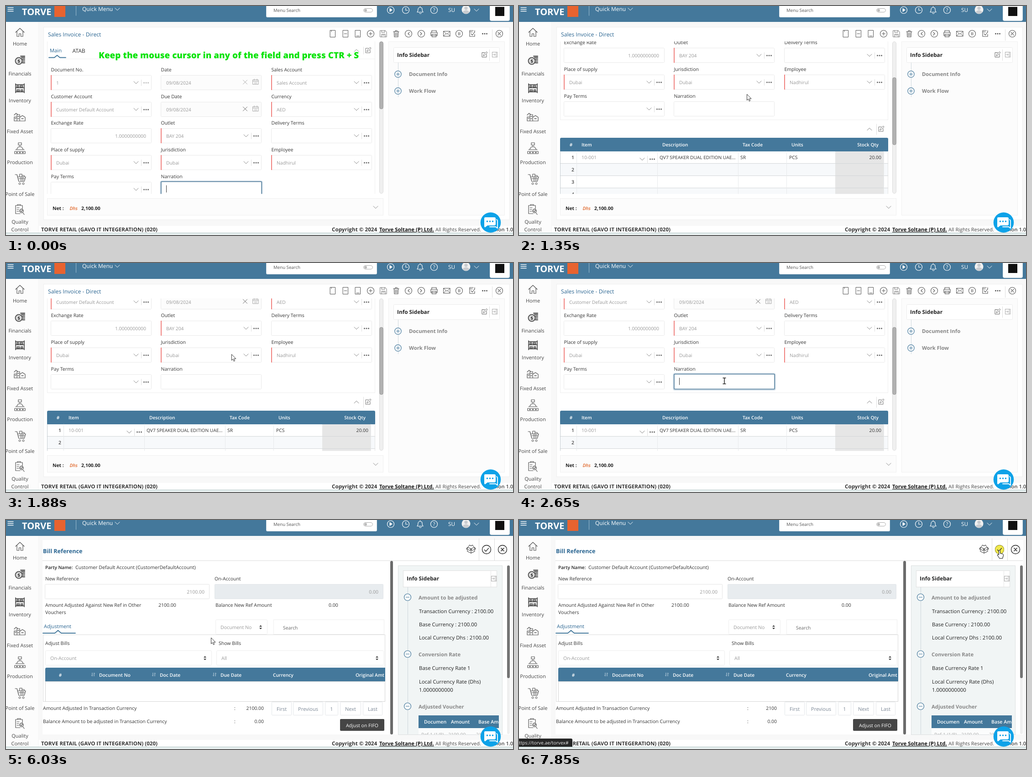
Animation, 1111 px wide and 504 px high, one loop 8000 ms. Source, as an HTML page:

```html
<!DOCTYPE html>
<html lang="en">
<head>
<meta charset="utf-8">
<title>Sales Invoice</title>
<style>
html, body { margin: 0; width: 100%; height: 100%; overflow: hidden; background: #f8f8f8; }
svg { display: block; width: 1111px; height: 504px; font-family: 'Open Sans', 'Noto Sans', sans-serif; text-rendering: geometricPrecision; }
</style>
</head>
<body>
<script>
const LOOP = 8000, BLUE = '#44789b', INK = '#333', SOFT = '#999', LINE = '#e9e9e9', ICON = '#555';

// Drawing helpers, each returns SVG markup
const text = (x, y, s, size = 10.5, fill = INK, weight = 400, anchor = 'start', extra = '') =>
  `<text x="${x}" y="${y}" font-size="${size}" fill="${fill}" font-weight="${weight}" text-anchor="${anchor}" ${extra}>${s}</text>`;
const rect = (x, y, w, h, fill = 'none', stroke = 'none', r = 0, extra = '') => {
  const o = stroke === 'none' ? 0 : .5;
  return `<rect x="${x + o}" y="${y + o}" width="${w - 2 * o}" height="${h - 2 * o}" rx="${r}" fill="${fill}" stroke="${stroke}" ${extra}/>`;
};
const path = (d, stroke = ICON, w = 1, fill = 'none') =>
  `<path d="${d}" fill="${fill}" stroke="${stroke}" stroke-width="${w}" stroke-linejoin="round" stroke-linecap="round"/>`;
const ring = (x, y, r, stroke = ICON, fill = 'none', w = 1) =>
  `<circle cx="${x}" cy="${y}" r="${r}" fill="${fill}" stroke="${stroke}" stroke-width="${w}"/>`;
const disc = (x, y, r, fill) => ring(x, y, r, 'none', fill);
const group = (id, body, attrs = '') => `<g id="${id}" ${attrs}>${body}</g>`;
const vline = (x, y1, y2, c = '#ddd') => path(`M${x + .5} ${y1}V${y2}`, c);
const hline = (x1, x2, y, c = '#ddd') => path(`M${x1} ${y + .5}H${x2}`, c);
const chevron = (x, y, c = '#777', up = 1, h = 5) => path(`M${x - h} ${y - up * 2.5}l${h} ${up * 5}l${h} ${-up * 5}`, c);
const dots = (x, y, c = '#666') => [-4.5, 0, 4.5].map(d => disc(x + d, y, 1.5, c)).join('');
const cross = (x, y, r, c, w = 1) => path(`M${x - r} ${y - r}l${2 * r} ${2 * r}m0 ${-2 * r}l${-2 * r} ${2 * r}`, c, w);
const pencil = (x, y, c = '#777') => path(`M${x + 1} ${y - 5}h-6v10h10v-6M${x - 2} ${y + 2}l1-3 6-6 2 2-6 6z`, c);
const panelIcon = (x, y) => rect(x - 6, y - 6, 12, 12, 'none', '#aaa') + path(`M${x + 3} ${y - 5}v10M${x - 4} ${y}h5m-2-2l2 2-2 2`, '#aaa');
const sorter = (x, y) => path(`M${x - 3} ${y - 1.2}l3-3.3 3 3.3zM${x - 3} ${y + 1.2}l3 3.3 3-3.3z`, 'none', 0, INK);

function header() {
  const w = '#fff';
  return rect(0, 0, 1111, 35, BLUE) +
    path('M4 3.5H16M4 7.5H16M4 11.5H16', w, 1.4) +
    text(35, 20, 'TORVE', 20, w, 700) + rect(106, 0, 24, 24, '#e8632f') +
    vline(153, 0, 21, '#9dbbce') + text(167, 11, 'Quick Menu', 12, w) + chevron(244, 7, w) +
    rect(570, -4, 243, 29, w, '#dde5ea', 2) + text(586, 12.5, 'Menu Search', 9.7, '#555') +
    rect(783, 5, 21, 9, w, '#aaa', 4.5) + disc(788, 9.5, 3, '#bbb') +
    [843, 876, 938].map(x => ring(x, 9, 7.5, w, 'none', 1.2)).join('') +
    path('M841 5.5v7l5-3.5z', w, 1, w) + path('M876 4.5v5h4', w, 1.2) + text(938, 13, '?', 11, w, 400, 'middle') +
    path('M901 13.5c2-2 2-4 2-6 0-6 9-6 9 0 0 2 0 4 2 6zM906 15.5c1 2 3 2 4 0M907.500 3V1', w, 1.2) +
    text(969, 13, 'SU', 11.8, w) + disc(1008, 8, 9.5, '#f1f1f1') + disc(1008, 5, 3.6, '#c9ccd0') +
    path('M1001 14c1-6 13-6 14 0-4 4-10 4-14 0z', 'none', 0, '#c9ccd0') + chevron(1031, 9, w) +
    rect(1060, -3, 44, 36, w, '#dfe6ea', 3) + rect(1072, 2, 20, 20, '#111');
}

function sideMenu() {
  const labels = [['Home', 87], ['Financials', 153], ['Inventory', 212], ['Fixed Asset', 280], ['Production', 348],
    ['Point of Sale', 418], ['Quality', 479], ['Control', 496]];
  return rect(0, 35, 70, 465, '#fcfcfc') + labels.map(([s, y]) => text(30.5, y, s, 11, '#444', 400, 'middle')).join('') +
    path('M21 58l9.500-9 9.500 9M24 56v11h4.500v-6h4v6h4.500V56', ICON, 1.2) +
    ring(28, 121, 7.5, ICON, '#ddd', 2) + text(28, 125, '$', 10, INK, 700, 'middle') +
    path('M32 110.500h9M34 113.500h7M36 117h5M37 121h4M36 125h5', INK, 2) +
    path('M21 171v20M40 171v20M21 180h19M21 189h19M21 173h19', INK, 1.5) +
    path('M24 175h4v4h-4zM31 175h6v4h-6zM24 184h6v4h-6zM33 184h4v4h-4z', INK, 1, '#999') +
    path('M18 253v-9h6v9zM24 253v-14h6v14zM30 253v-8l6-4 6 4v8zM18 240l4-4 4 3', ICON, 1.2) +
    path('M20 247h2M26 243h2M26 248h2M34 248h4', ICON, 1.5) +
    path('M27 301h7v5h-7zM30.500 306v4M23 316l4-6h7l4 6zM21 316h19M19 320h23v5H19z', ICON, 1.2) +
    [24, 30.5, 37].map(x => disc(x, 322.5, 1.5, ICON)).join('') +
    path('M20 371h4l4 15h12l3-10H26M30 376V370h5v6M35 376v-3h5v3M28 380h13M33 377v9M37 377v9', ICON, 1.2) +
    ring(30, 391, 2, ICON) + ring(38, 391, 2, ICON) +
    path('M21 439h15v7M21 439v18h10M25 439v-2h7v2M24 444h5M24 448h4M24 452h4', ICON, 1.2) +
    ring(34, 451, 4, ICON, '#eee', 1.3) + path('M32 451l1.500 1.500 3-3M37 455l3 4', ICON, 1.2);
}

function toolbar() {
  const page = x => path(`M${x - 5.5} 53.500h11v15h-11z`);
  return [716, 744, 771].map(page).join('') + path('M713 53.500v3M741 61h6M768 66h6') +
    [799, 882, 910, 993, 1081].map(x => ring(x, 61, 7.5, ICON, 'none', 1.1)).join('') +
    path('M795.500 61h7M799 57.500v7') +
    group('save', path('M820 54h11l3 3v11h-14zM823 54v4h7v-4M823 68v-6h8v6M825 64h4', '#777')) +
    path('M849 56.500h12M853 56v-2h4v2M850.500 57l.5 11h8l.5-11M853.500 59v7M856.500 59v7', ICON, 1.2) +
    path('M884 58l-3 3 3 3M908 58l3 3-3 3M991.500 58v6M994.500 58v6', ICON, 1.2) +
    path('M933 58v-4h10v4M931 58h14v7h-14zM933.500 62h9v6h-9z', ICON, 1.2) +
    path('M959 55.500h14v11h-14zM959 56l7 6 7-6M959 66l5-5M973 66l-5-5') +
    path('M1024 54h-8v13h11v-5M1016 57h6M1019 61l3 3 5-7M1027 54v4', ICON, 1.1) +
    dots(1049, 61, ICON) + vline(1065, 52, 76) + cross(1081, 61, 3, ICON, 1.1);
}

// One form cell: kind is 'pick', 'date' or 'plain'
function field(col, row, label, value, kind, must) {
  const x = [98, 339, 581][col], y = 152 + Math.round(58.7 * row), m = y + 16.5;
  let s = text(x + .5, y - 8, label, 10.5, INK, 500) + rect(x, y, 221, 33, kind === 'date' ? '#fcfcfc' : '#fff', LINE, 1);
  if (must) s += rect(x, y, 2, 33, '#f0827f');
  if (kind === 'plain') return s + text(x + 209, m + 4, value, 10.4, SOFT, 400, 'end');
  s += text(x + 12, m + 4, value, 10.3, SOFT);
  if (kind === 'pick') return s + chevron(x + 187, m, '#888') + vline(x + 198, m - 6, m + 7) + dots(x + 209, m + .5, label === 'Document No.' ? '#bbb' : '#666');
  const cx = x + 208, cy = m - 2;
  return s + cross(x + 185, m - 1, 4.5, row ? '#666' : '#aaa') + path(`M${cx - 6} ${cy - 4}h12v10h-12zM${cx - 6} ${cy - 1}h12M${cx - 3} ${cy - 6}v3M${cx + 3} ${cy - 6}v3`, '#aaa') +
    path(`M${cx - 3} ${cy + 1.5}h6M${cx - 3} ${cy + 4}h6`, '#bbb');
}

function itemTable() {
  const top = 467, first = 497, h = 27;
  const heads = [[137, 'Item'], [314, 'Description'], [490, 'Tax Code'], [597, 'Units']];
  let s = path(`M90 ${first}V${top + 3}q0-3 3-3H806q3 0 3 3V${first}z`, 'none', 0, BLUE) +
    text(114, 486, '#', 10.2, '#fff', 600, 'middle') + heads.map(([x, l]) => text(x, 486, l, 10.2, '#fff', 600)).join('') +
    text(788, 486, 'Stock Qty', 10.2, '#fff', 600, 'end');
  for (let i = 0; i < 5; i++) {
    const y = first + h * i;
    s += rect(90, y, 719, h, i % 2 ? '#f7f9fb' : '#fff') + rect(693, y, 106, h, '#e6e6e6') +
      hline(90, 809, y + h - 1, '#d3d6d8') + text(121, y + 17, i + 1, 10.4, '#444', 600, 'end');
  }
  s += [126, 303, 480, 586, 799].map(x => vline(x, first, 632, '#e8eaec')).join('') + vline(90, first, 632, '#c5ccd1') + vline(808, first, 632, '#e2e2e2');
  return s + group('cellEdit', text(137, 514, '10-001', 10.4, SOFT) + chevron(270, 514, '#777') + vline(281, 507, 522) + dots(292, 514)) +
    group('cellPlain', text(131.5, 514, '10-001', 10.4)) +
    text(308, 514, 'QV7 SPEAKER DUAL EDITION UAE...', 10.2) + text(485, 514, 'SR', 10.4) + text(592, 514, 'PCS', 10.4) + text(794, 514, '20.00', 10.4, INK, 400, 'end');
}

function invoice() {
  const fields = [
    [0, 0, 'Document No.', '1', 'pick', 1], [1, 0, 'Date', '09/08/2024', 'date'], [2, 0, 'Sales Account', 'Sales Account', 'pick', 1],
    [0, 1, 'Customer Account', 'Customer Default Account', 'pick', 1], [1, 1, 'Due Date', '09/08/2024', 'date'], [2, 1, 'Currency', 'AED', 'pick', 1],
    [0, 2, 'Exchange Rate', '1.0000000000', 'plain'], [1, 2, 'Outlet', 'BAY 204', 'pick', 1], [2, 2, 'Delivery Terms', '', 'pick'],
    [0, 3, 'Place of supply', 'Dubai', 'pick', 1], [1, 3, 'Jurisdiction', 'Dubai', 'pick', 1], [2, 3, 'Employee', 'Nadhirul', 'pick', 1],
    [0, 4, 'Pay Terms', '', 'pick'], [1, 4, 'Narration', '', 'plain']];
  const content = rect(90, 60, 719, 368, '#fff', '#eee') +
    text(96, 102, 'Main', 11.2, '#2a6591') + text(145.5, 102.5, 'ATAB', 12.1, INK) + hline(131, 809, 116, '#f2f2f2') +
    path('M94 113.500h12l6-5 6 5h13', BLUE, 1.8) + chevron(768, 98, '#888', -1) + vline(783, 90, 106) + pencil(793, 98) +
    fields.map(f => field(...f)).join('') +
    group('glow', rect(338, 385, 224, 37, 'none', '#c9d8e4', 3, 'stroke-width="2"') + rect(339.5, 386, 221, 34, '#fff', '#4a7797', 1.5, 'stroke-width="1.500"')) +
    group('caret', vline(351, 395, 410, '#333')) +
    chevron(768, 448, '#777', -1) + vline(783, 437, 460) + pencil(793, 448) + itemTable();
  return rect(82, 46, 1022, 425, '#fff', '#eee') + text(92, 66.5, 'Sales Invoice - Direct', 12.2, '#2a6591') + toolbar() +
    `<g clip-path="url(#formClip)">${group('form', content)}</g>` +
    rect(818, 78, 9, 335, '#f0f0f0', '#dcdcdc', 4.5) + group('thumb', rect(818, 78, 9, 149, '#b2b2b2', '#9a9a9a', 4)) +
    rect(90, 423, 737, 38, '#fcfcfc', '#f0f0f0') + text(102, 448.5, 'Net :', 10.4, '#222', 700) +
    text(139.5, 448.5, 'Dhs', 10.2, '#e0672a', 600, 'start', 'font-style="italic"') + text(165, 448.5, '2,100.00', 10.4, '#222', 700) + chevron(810, 443, '#888') +
    rect(838, 78, 255, 383, '#fcfcfc', '#f0f0f0') + rect(849, 91, 233, 34, '#fff', '#ececec', 2) + text(857, 111.5, 'Info Sidebar', 11.8, '#222', 700) +
    pencil(1048, 107.5, '#666') + vline(1059, 96, 120) + panelIcon(1071, 107) + vline(859, 125, 200, '#cfd8de') +
    [[150, 'Document Info'], [187, 'Work Flow']].map(([y, s]) => ring(859, y, 7.2, BLUE, '#fff', 1.2) + path(`M855.500 ${y}h7M859 ${y - 3.5}v7`, BLUE, 1.2) + text(883, y + 3.5, s, 11.3, '#858585', 700)).join('');
}

function billBody() {
  const select = (x, y, w, s) => rect(x, y, w, 33, '#fff', '#eee', 2) + text(x + 11, y + 21, s, 10.5, SOFT) + sorter(x + w - 15, y + 17);
  const heads = [[204, 'Document No'], [337, 'Doc Date'], [470, 'Due Date'], [585, 'Currency'], [766, 'Original Amt']];
  const pages = [[582, 44, 'First'], [629, 66, 'Previous'], [699, 29, '1'], [732, 46, 'Next'], [782, 43, 'Last']];
  return text(86, 107.5, 'Party Name:', 10.1, '#222', 600) + text(152, 107.5, 'Customer Default Account (CustomerDefaultAccount)', 10.6) +
    text(86, 133, 'New Reference', 10.5, INK, 500) + text(457, 133, 'On-Account', 10.5, INK, 500) +
    rect(85, 141, 361, 33, '#fff', '#e4e4e4', 1) + group('refRing', rect(85.5, 141, 360.5, 33, 'none', '#7d8488', 2, 'stroke-width="1.500"')) +
    text(435, 161.5, '2100.00', 10.5, SOFT, 400, 'end') + rect(457, 141, 370, 33, '#e8ecef', '#e2e6e9', 1) + text(816, 161.5, '0.00', 10.5, SOFT, 400, 'end') +
    text(86, 191, 'Amount Adjusted Against New Ref in Other') + text(86, 207, 'Vouchers') + text(334, 191, '2100.00') +
    text(459, 191, 'Balance New Ref Amount') + text(707, 191, '0.00') +
    text(83, 238, 'Adjustment', 11.1, '#2a6591') + path('M81 249h26l7-6 7 6h31', BLUE, 1.8) +
    select(459, 219, 114, 'Document No') + rect(586, 219, 243, 33, '#fff', '#eee') + text(607, 240.5, 'Search', 10.3, '#666') +
    rect(81, 252, 750, 148, 'none', '#dcdcdc') + text(86, 275, 'Adjust Bills', 10.5, INK, 500) + text(466, 275, 'Show Bills', 10.5, INK, 500) +
    select(86, 287, 365, 'On-Account') + select(461, 287, 367, 'All') +
    path('M86 355V328q0-3 3-3H831v30z', 'none', 0, BLUE) + rect(86, 355, 745, 45, '#fff', '#d5d5d5') +
    text(119, 345, '#', 10.2, '#fff', 600, 'middle') + heads.map(([x, s]) => text(x, 345, s, 10.3, '#fff', 600)).join('') +
    [191, 324, 457].map(x => path(`M${x - 2} 336.500v7l-1.500-1.500M${x + 2} 343.500v-7l1.500 1.500`, '#c8dae6')).join('') +
    text(81, 418, 'Amount Adjusted In Transaction Currency', 10.6) + text(81, 447, 'Balance Amount to be adjusted in Transaction Currency', 10.5) +
    text(500, 418, ':') + text(500, 447, ':') + text(565, 447, '0.00', 10.4, INK, 400, 'end') + text(565, 418, '2100.00', 10.4, INK, 400, 'end', 'id="adjusted"') +
    pages.map(([x, w, s]) => rect(x, 400, w, 30, '#fff', '#e3e6e9', 1) + text(x + w / 2, 419.5, s, 11, '#7c8896', 400, 'middle')).join('') +
    rect(732, 438, 97, 26, '#454545', 'none', 2) + text(780.5, 455.5, 'Adjust on FIFO', 10.5, '#fff', 400, 'middle') +
    rect(842, 90, 6, 382, '#6b6b6b', 'none', 3);
}

function billSide() {
  const titles = [[170, 'Amount to be adjusted'], [295, 'Conversion Rate'], [410, 'Adjusted Voucher']];
  const lines = [[205, 'Transaction Currency : 2100.00'], [234, 'Base Currency : 2100.00'], [263, 'Local Currency Dhs : 2100.00'],
    [330, 'Base Currency Rate 1'], [359.5, 'Local Currency Rate (Dhs)'], [377.5, '1.0000000000']];
  return rect(859, 100, 229, 373, '#f1f5f5', '#dcdfe0') + rect(870, 111, 206, 37, '#fff', '#e0e0e0') + text(878, 133, 'Info Sidebar', 11.8, '#222', 700) +
    vline(1062, 112, 147, '#e6e6e6') + panelIcon(1069, 129) + vline(880, 148, 471, '#ccd6dc') +
    titles.map(([y, s]) => ring(880, y, 7.5, BLUE, '#f8fafa', 1.2) + path(`M876.500 ${y}h7`, BLUE, 1.2) + text(904, y + 5, s, 11.3, '#888', 700)).join('') +
    lines.map(([y, s]) => text(905, y, s, 11.4, '#222')).join('') +
    `<g clip-path="url(#miniClip)">${rect(904, 430, 176, 28, BLUE)}${[[916, 'Document'], [975, 'Amount'], [1035, 'Base Amount']].map(([x, s]) => text(x, 448, s, 10.6, '#fff', 600)).join('')}` +
    `${rect(904, 458, 176, 14, '#fbfcfc')}${rect(965, 430, 8, 28, BLUE)}${[[910, 'Ref-1 (1/8)'], [969, '2100.00'], [1030, '2100.00']].map(([x, s]) => text(x, 476, s, 10.4, '#aaa')).join('')}</g>` +
    rect(1098, 100, 6, 371, '#efefef', 'none', 3) + rect(1098, 100, 6, 248, '#747474', 'none', 3);
}

function bill() {
  return rect(80, 36, 1031, 446, '#f8f8f8') + rect(80, 44, 1025, 428, '#fff') +
    text(81, 72.5, 'Bill Reference', 12.6, '#2a6591', 700) + hline(80, 1104, 89) +
    path('M1011 60l8 3 8-3v9l-8 4-8-4zM1019 63v10M1011 60l-2 4 8 3 2-4 2 4 8-3-2-4M1013 59l3-4 3 2 3-2 3 4', '#444', 1.1) +
    vline(1036, 41, 89) + vline(1070, 41, 89) +
    ring(1053, 65, 9.5, '#222', '#fff', 1.3) + group('mark', disc(1053, 65, 10, '#eee52f')) + path('M1048.500 65.500l3 3.500 6-7', '#333', 1.4) +
    ring(1088, 65, 9.5, '#222', '#fff', 1.3) + cross(1088, 65, 3.2, '#222', 1.5) + billBody() + billSide();
}

function footer() {
  return rect(72, 484, 1039, 15, '#fff') + rect(0, 499, 1111, 5, '#e9f1f1') + hline(0, 1111, 499, '#a9c0c0') +
    text(77, 496, 'TORVE RETAIL (GAVO IT INTEGERATION) (020)', 11.6, INK, 700) + text(714, 496, 'Copyright © 2024', 11.7, INK, 700) +
    text(818, 496, 'Torve Soltane (P) Ltd.', 11.4, '#111', 700, 'start', 'text-decoration="underline"') +
    text(941, 496, 'All Rights Reserved.', 11, '#444') + text(1052, 496, 'Version 1.0', 11.2, '#444', 600) +
    disc(1062, 476.5, 22.3, '#0ea2e8') + path('M1050 465h20q3 0 3 3v12q0 3-3 3h-15l-5 4q-2 0-2-2v-17q0-3 2-3z', 'none', 0, '#fff') +
    path('M1075 470q2 1 2 3v16l-4-3h-13', '#fff', 1.8) +
    [1054.5, 1060.5, 1066.5].map(x => disc(x, 474, 1.8, '#0ea2e8')).join('');
}

const pointers =
  group('arrow', path('M.5.5v13l3-2.800 2 4.800 2.200-1-2-4.500h4z', '#333', 1, '#fff')) +
  group('beam', path('M-3-6.500h2.500q.5 0 .5.5v12q0 .5-.5.500H-3M3-6.500H.5Q0-6.500 0-6M3 6.500H.5Q0 6.500 0 6', '#222', 1.5)) +
  group('hand', path('M-1.500 10V1.500q0-1.500 1.500-1.500t1.500 1.500V7l5 1q2 .5 2 3l-1 4-1 3H0l-4-6q-1.500-2.500.5-2.500z', '#222', 1.1, '#fff'));

document.body.innerHTML = `<svg viewBox="0 0 1111 504"><defs>
<clipPath id="formClip"><rect x="82" y="78" width="736" height="335.500"/></clipPath>
<clipPath id="miniClip"><rect x="904" y="425" width="176" height="47"/></clipPath></defs>
${rect(0, 0, 1111, 504, '#f8f8f8')}${header()}${sideMenu()}${invoice()}${group('bill', bill())}
${group('hint', text(203, 115, 'Keep the mouse cursor in any of the field and press CTR + S', 18.85, '#0be30b', 800))}${footer()}
${group('link', path('M0 481h114q3 0 3 3v15H0z', 'none', 0, '#262626') + text(0, 494, 'ttps://torve.ae/torvex#', 10.3, '#eee'))}${pointers}</svg>`;

const el = Object.fromEntries([...document.querySelectorAll('[id]')].map(n => [n.id, n]));
const show = (id, on) => el[id].setAttribute('opacity', +on);
const shift = (id, x, y) => el[id].setAttribute('transform', `translate(${x} ${y})`);
const mix = (a, b, p) => a + (b - a) * p;
const within = (t, a, b) => t >= a && t < b;
const easeOut = (p, n) => 1 - (1 - p) ** n;
const smooth = p => p * p * (3 - 2 * p);
// Index of the current step among n, running from time a to b
const stepAt = (t, a, b, n) => t < a ? -1 : Math.min(n - 1, Math.floor((t - a) / (b - a) * (n - 1) + .01));

function pointerAt(t) {
  let from, to, p;
  if (t < 1880) [from, to, p] = [[988, 495], [499, 194], easeOut(Math.max(0, stepAt(t, 470, 880, 7)) / 6, 2)];
  else if (t < 6620) [from, to, p] = [[499, 194], [449, 259], smooth((stepAt(t, 1880, 2160, 5) + 1) / 5)];
  else [from, to, p] = [[449, 259], [1046, 60], smooth(stepAt(t, 6620, 7400, 11) / 10)];
  return [mix(from[0], to[0], p), mix(from[1], to[1], p)];
}

function draw(t) {
  const rise = easeOut((stepAt(t, 1280, 1680, 7) + 1) / 7, 3.7);
  const scroll = t < 70 ? 0 : Math.round(mix(264, 142, rise));
  shift('form', 0, -scroll);
  shift('thumb', 0, Math.round(scroll * .444));
  show('hint', t < 70);

  const fade = (stepAt(t, 4950, 5210, 5) + 1) / 5;
  show('glow', t < 70 ? 1 : t >= 2650 ? 1 - fade : 0);
  show('caret', t < 70 || within(t, 2650, 3170) || within(t, 3690, 4950));
  show('cellEdit', t < 5010);
  show('cellPlain', t >= 5010);
  show('save', 1 - fade * .5);

  show('bill', t >= 6030);
  show('refRing', within(t, 6290, 7720));
  show('mark', t >= 7720 ? .85 : 0);
  show('link', t >= 7590);
  el.adjusted.textContent = t < 7720 ? '2100.00' : '2100';

  const beam = within(t, 2430, 4880), hand = t >= 7460;
  show('beam', beam);
  show('hand', hand);
  show('arrow', t >= 470 && !beam && !hand);
  shift('arrow', ...pointerAt(t));
  shift('beam', 450, 259.5);
  shift('hand', 1053, 66.5);
}

const start = performance.now();
function tick() {
  draw((performance.now() - start) % LOOP);
  requestAnimationFrame(tick);
}
tick();
</script>
</body>
</html>
```
